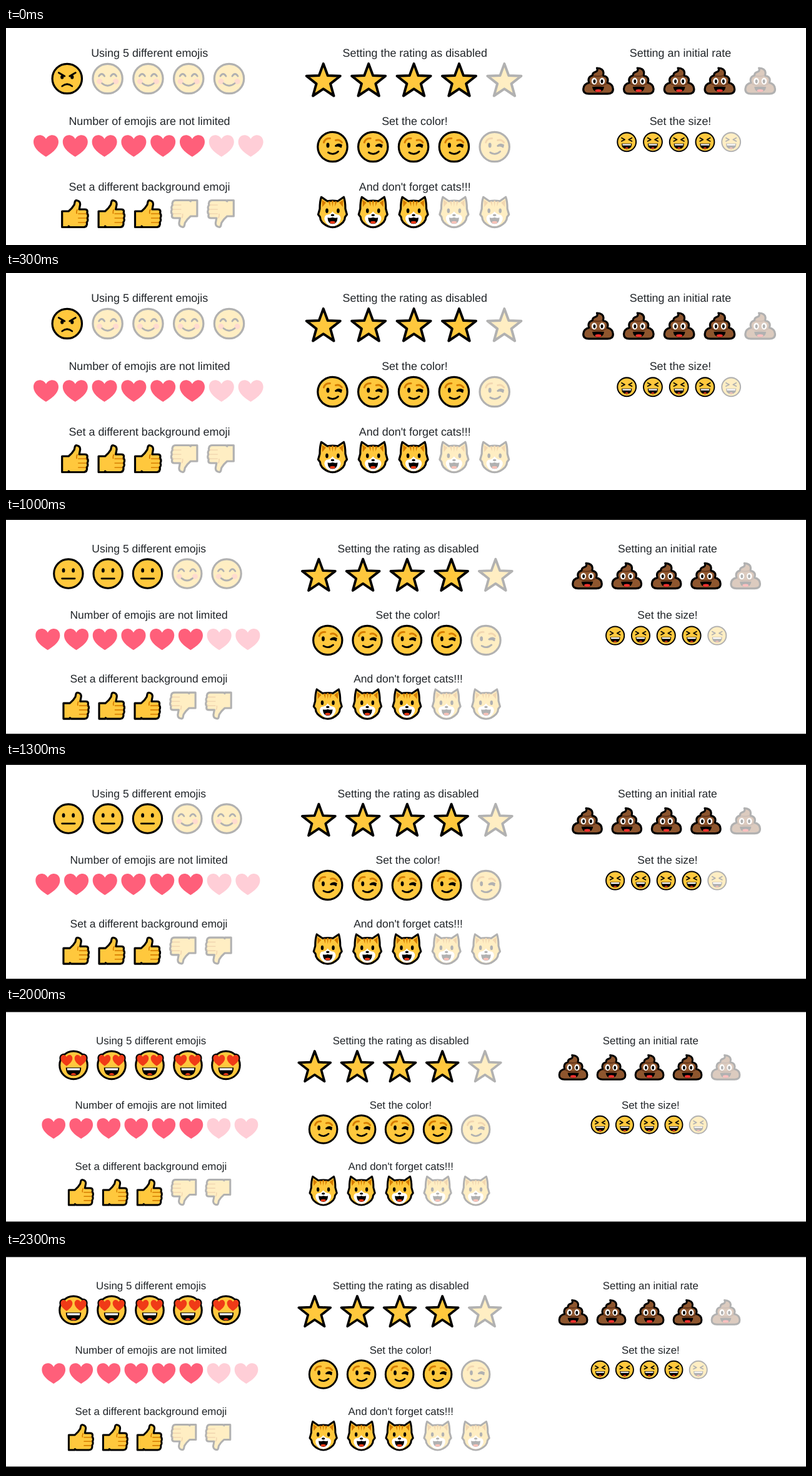
An HTML page that plays this animation: 1280 by 347 pixels, repeating every 2500 ms.

```html
<!DOCTYPE html>
<html lang="en">
<head>
<meta charset="utf-8">
<title>Emoji ratings</title>
<style>
html, body { margin: 0; width: 100%; height: 100%; overflow: hidden; background: #000; }
svg { display: block; }
text {
  font: 17.95px "Liberation Sans", Arial, sans-serif; fill: #212529;
  text-anchor: middle; text-rendering: geometricPrecision;
}
.ink { fill: none; stroke: #000; stroke-width: 2.8; stroke-linecap: round; stroke-linejoin: round; }
.brow { fill: none; stroke: #d67d00; stroke-width: 3; stroke-linecap: round; }
.gold { fill: #ffc83d; stroke: #000; stroke-width: 3.2; stroke-linejoin: round; }
</style>
</head>
<body>
<svg width="1280" height="347" viewBox="0 0 1280 347">
  <defs id="defs"></defs>
  <rect id="page" width="1280" fill="#fff"/>
  <g id="board"></g>
</svg>
<script>
const $ = id => document.getElementById(id);
const path = (cls, d) => `<path class="${cls}" d="${d}"/>`;
const fill = (color, d) => `<path fill="${color}" d="${d}"/>`;
const oval = (x, y, rx, ry, color = '#000') =>
  `<ellipse cx="${x}" cy="${y}" rx="${rx}" ry="${ry}" fill="${color}"/>`;
const mirror = s => s + `<g transform="scale(-1 1)">${s}</g>`;
const disc = '<circle class="gold" r="23.7"/>';
const heartPath = 'M0 17.5C-7 13-20 5-20-6.5C-20-19-5-21 0-11C5-21 20-19 20-6.5C20 5 7 13 0 17.5Z';
const grin = fill('#000', 'M-13 4H13Q13 18 0 18Q-13 18-13 4Z') +
  fill('#fff', 'M-11 5H11L10.5 8.5H-10.5Z') + fill('#f03a17', 'M-5 16Q0 11 5 16Q0 18-5 16Z');

function starPath() {
  let d = '';
  for (let i = 0; i < 10; i++) {
    const r = i % 2 ? 11.8 : 28.4, a = i * Math.PI / 5;
    d += `${i ? 'L' : 'M'}${(r * Math.sin(a)).toFixed(2)} ${(-r * Math.cos(a)).toFixed(2)}`;
  }
  return d + 'Z';
}

const eyeHeart = (x, extra) =>
  `<path d="${heartPath}" transform="translate(${x} -8) scale(.5 .54)" ${extra}/>`;
const heartPair = extra => eyeHeart(-11.8, extra) + eyeHeart(11.8, extra);

const thumb = path('gold', 'M-20.5-4H-10Q-4-9-1-14.5L0-19Q1-22 4-21Q8.5-20 8.5-15L7-7H16Q20-7 20-3.5Q20-1.5 19 0Q21-.5 21 3.5Q21 6 19.5 7Q21 8 20.5 11Q20 13.5 18.5 14Q20 15 19 18Q18 21.5 14 21.5H-8L-10 20V21.5H-20.5Z') +
  '<path d="M5 0H19M5 7H19M5 14H18M4-7Q2-3 3 0" fill="none" stroke="#d67d00" stroke-width="1.7"/>';

const shapes = {
  angry: disc + mirror(path('ink', 'M-13.5-9.5L-4-4')) + mirror(oval(-8, -2.5, 2.6, 3.3)) +
    path('ink', 'M-8 12Q0 5.5 8 12'),
  sad: disc + mirror(path('brow', 'M-15-6Q-8-8-5.5-13.5')) +
    mirror(path('ink', 'M-15-1Q-10 4-5-1')) + path('ink', 'M-7 12.5Q0 7 7 12.5'),
  neutral: disc + mirror(oval(-8, -5.5, 2.5, 3.6)) + path('ink', 'M-10.5 8H10.5'),
  smile: disc + mirror(oval(-13, 4.5, 4.6, 4.4, '#ff8a62') + path('ink', 'M-14-4Q-9.5-11-5-4')) +
    path('ink', 'M-9 7.5Q0 15 9 7.5'),
  love: heartPair('stroke="#000" stroke-width="9" stroke-linejoin="round"') + disc +
    heartPair('fill="#f03a17"') + grin,
  wink: disc + path('brow', 'M-14-7Q-12-14-4-13.5') + path('brow', 'M5-10.5Q11-12.5 15-7') +
    oval(-7.5, -2.5, 2.5, 4) + path('ink', 'M5-1.5Q9-5.5 14-2.5M6-1.5Q10-2.5 13.5 0') +
    path('ink', 'M-7 9Q1 14.5 9 7.5'),
  laugh: disc + mirror(path('ink', 'M-13-10.5L-5-6L-13-2')) + grin,
  star: path('gold" stroke-linejoin="round" style="stroke-width:4', starPath()),
  heart: fill('#ff5f7a', heartPath),
  poo: '<path d="M-2-20.5Q8-20 8.5-13Q8.5-10 7.5-8.5Q15-7.5 15.5-1.5Q15.5 1 14.5 3Q23.5 5 23.8 13Q24 20.7 15 20.7H-15Q-24 20.7-23.8 13Q-23.5 5-14.5 3Q-15.5 1-15.5-1.5Q-15-7.5-9-8.5Q-9.5-13-4-14.5Q0-16-2-20.5Z" ' +
    'fill="#8e562e" stroke="#000" stroke-width="3.2" stroke-linejoin="round"/>' +
    '<path d="M-8-8Q2-6 7-9M-14 4Q-7 8.5 0 8Q7 8.5 14 4" fill="none" stroke="#63351a" stroke-width="2"/>' +
    mirror(oval(-6.3, .5, 4.3, 5.4, '#fff') + oval(-6, .8, 2, 3.1)) +
    fill('#000', 'M-9.5 9.5H9.5Q8.5 18 0 18Q-8.5 18-9.5 9.5Z') + oval(0, 15.6, 5, 2.2, '#f8312f'),
  up: thumb,
  down: `<g transform="rotate(180)">${thumb}</g>`,
  cat: path('gold', 'M-18-24L-8.5-17.5Q0-19 8.5-17.5L18-24Q20.5-17 20.5-5L23 4L20 8Q20 12 17 16Q9 24.3 0 24.3Q-9 24.3-17 16Q-20 12-20 8L-23 4L-20.5-5Q-20.5-17-18-24Z') +
    mirror(fill('#d67d00', 'M-17-19.5L-10.5-15L-16.5-8Z') +
      fill('#d67d00', 'M-7-17H-3.5L-4-9Z')) +
    fill('#d67d00', 'M-1.5-18H1.5L0-8Z') +
    fill('#fff', 'M0-1Q3 4 10 4.5Q15 8 12 14.5Q8 22.7 0 22.7Q-8 22.7-12 14.5Q-15 8-10 4.5Q-3 4 0-1Z') +
    mirror(oval(-9, -2, 2.3, 3.7)) + oval(0, 5, 2.8, 1.8) +
    fill('#000', 'M-8 9Q-4 10 0 8.5Q4 10 8 9Q7.5 19 0 19Q-7.5 19-8 9Z') + oval(0, 16.5, 4.3, 2, '#f03a17')
};

// title, title x, baseline, first icon x, icon y, step, count, rate, icon, empty icon, size
const ratings = [
  ['Using 5 different emojis', 229.7, 45.7, 97.8, 81, 64.8, 5, 1, 'angry', 'smile'],
  ['Setting the rating as disabled', 654.3, 45.7, 507.8, 85.5, 72.4, 5, 4, 'star'],
  ['Setting an initial rate', 1079, 45.7, 947.5, 84.5, 64.8, 5, 4, 'poo'],
  ['Number of emojis are not limited', 229.5, 154.7, 64, 188.5, 46.8, 8, 6, 'heart'],
  ['Set the color!', 654, 154.7, 522.5, 190, 64.8, 5, 4, 'wink'],
  ['Set the size!', 1079, 154.7, 993.2, 182.3, 41.75, 5, 4, 'laugh', 'laugh', .63],
  ['Set a different background emoji', 229.5, 259.5, 110.2, 297, 58.4, 5, 3, 'up', 'down'],
  ["And don't forget cats!!!", 654.3, 259.5, 522.5, 294.3, 64.8, 5, 3, 'cat']
];

// scale, offset x, offset y, page top, page bottom, face
const views = [
  [1, 0, 0, 0, 347, 'angry'],
  [.983, 9.9, .6, 10, 337, 'sad'],
  [.977, 4.3, 9.9, 3, 345, 'neutral'],
  [.97, 27.9, -.2, 11, 337, 'smile'],
  [.941, 16, 15.2, 6.5, 341.5, 'love']
];

function row([title, tx, ty, x, y, step, count, rate, icon, empty = icon, size = 1]) {
  let out = `<text x="${tx}" y="${ty}">${title}</text>`;
  for (let i = 0; i < count; i++) {
    const on = i < rate;
    out += `<use href="#${on ? icon : empty}" opacity="${on ? 1 : .3}" ` +
      `transform="translate(${x + i * step} ${y}) scale(${size})"/>`;
  }
  return out;
}

$('defs').innerHTML = Object.entries(shapes).map(([id, s]) => `<g id="${id}">${s}</g>`).join('');

let shown = -1;
function draw(now) {
  const n = Math.floor(now % 2500 / 500);
  if (n !== shown) {
    shown = n;
    const [scale, x, y, top, bottom, face] = views[n];
    ratings[0][7] = n + 1;
    ratings[0][8] = face;
    $('page').setAttribute('y', top);
    $('page').setAttribute('height', bottom - top);
    $('board').setAttribute('transform', `translate(${x} ${y}) scale(${scale})`);
    $('board').innerHTML = ratings.map(row).join('');
  }
  requestAnimationFrame(draw);
}
draw(performance.now());
</script>
</body>
</html>
```
